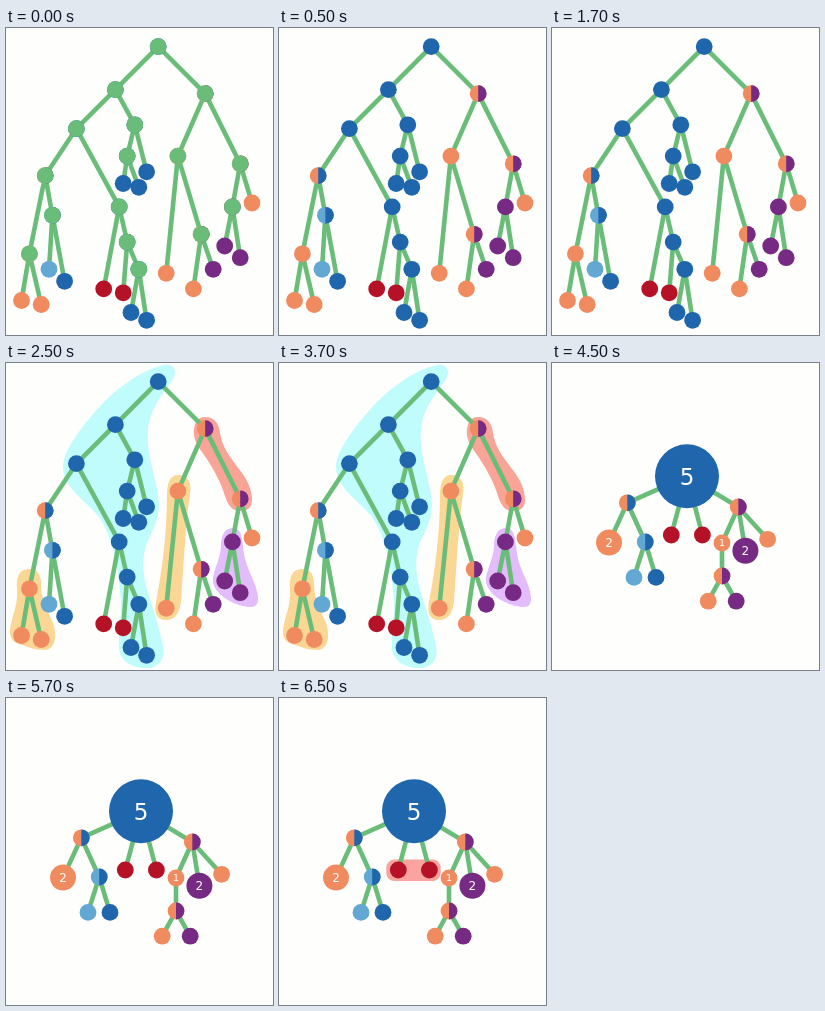
Animation, 267 px wide and 307 px high, one loop 8000 ms. Source, as an HTML page:

```html
<!DOCTYPE html>
<html lang="en">
<head>
<meta charset="utf-8">
<title>Tree contraction</title>
<style>
html, body { margin: 0; width: 100%; height: 100%; overflow: hidden; background: #fefefc; }
svg { display: block; width: 100vw; height: 100vh; }
text { font-family: "DejaVu Sans", sans-serif; fill: #fff; text-anchor: middle; }
</style>
</head>
<body>
<svg id="stage" viewBox="0 0 267 307"></svg>
<script>
const NS = "http://www.w3.org/2000/svg";
const stage = document.getElementById("stage");
const GREEN = "#6abd79";
const RADIUS = 8.4;
const COLOR = { o: "#f08b60", b: "#1f66ad", l: "#62a8d3", p: "#762a83", r: "#b51228" };

function add(parent, tag, attrs = {}) {
  const el = document.createElementNS(NS, tag);
  for (const key in attrs) el.setAttribute(key, attrs[key]);
  parent.appendChild(el);
  return el;
}
const group = attrs => add(stage, "g", attrs);

// Two colour letters give a node split into left and right halves.
function drawNode(parent, [x, y, colors, r = RADIUS, label, size]) {
  add(parent, "circle", { cx: x, cy: y, r, fill: COLOR[colors[0]] });
  if (colors[1])
    add(parent, "path", { d: `M${x} ${y - r}A${r} ${r} 0 0 1 ${x} ${y + r}Z`, fill: COLOR[colors[1]] });
  if (label)
    add(parent, "text", { x, y: y + size * 0.365, "font-size": size }).textContent = label;
}

function drawEdges(parent, nodes, list) {
  for (const pair of list.split(" ")) {
    const [a, b] = [nodes[pair[0]], nodes[pair[1]]];
    add(parent, "line", { x1: a[0], y1: a[1], x2: b[0], y2: b[1], stroke: GREEN, "stroke-width": 4.6 });
  }
}

const full = {
  A: [152, 18.3, "b"], B: [109.2, 61.3, "b"], C: [199, 65.3, "op"], D: [70.2, 100.3, "b"],
  E: [128.6, 96.5, "b"], F: [171.7, 127.8, "o"], G: [234, 135.5, "op"], H: [39, 147.3, "ob"],
  I: [121, 127.8, "b"], J: [140.4, 143.5, "b"], K: [117, 155.2, "b"], L: [132.6, 159, "b"],
  M: [113, 178.6, "b"], N: [46.2, 187, "lb"], O: [23.2, 225.5, "o"], P: [15.3, 272.2, "o"],
  Q: [35, 276.2, "o"], R: [42.8, 241, "l"], S: [58.4, 253, "b"], T: [121, 213.8, "b"],
  U: [97.5, 260.6, "r"], V: [117, 264.5, "r"], W: [132.6, 241, "b"], X: [124.8, 284.2, "b"],
  Y: [140.4, 292, "b"], Z: [160, 245, "o"], a: [195, 206, "op"], b: [187.2, 260.6, "o"],
  c: [207, 241, "p"], d: [226.2, 178.6, "p"], e: [245.8, 174.7, "o"], f: [218.5, 217.7, "p"],
  g: [234, 229.4, "p"]
};
const fullEdges = "AB AC BD BE EI EJ IK IL CF CG FZ Fa ab ac Gd Ge df dg " +
  "DH DM HO HN OP OQ NR NS MU MT TV TW WX WY";

const small = {
  A: [135, 113.3, "b", 32, "5", 23], B: [75.3, 139.8, "ob"], C: [57, 179.6, "o", 13, "2", 12],
  D: [93.2, 179, "lb"], E: [82, 214.4, "l"], F: [104, 214.4, "b"], G: [119.3, 172, "r"],
  H: [150.4, 172, "r"], I: [186.3, 144, "op"], J: [170, 180, "o", RADIUS, "1", 9.5],
  K: [193.4, 187.7, "p", 13, "2", 12], L: [215.6, 176.3, "o"], M: [170, 213, "op"],
  N: [156.2, 238.2, "o"], O: [184.2, 238.2, "p"]
};
const smallEdges = "AB AG AH AI BC BD DE DF IJ IK IL JM MN MO";

const regions = [
  ["#bffcfb", "M158 2C167 0 172 7 167 16C159 29 143 45 142 68C140 86 146 101 150 122" +
    "C156 145 152 158 143 175C135 191 136 211 142 230C147 246 154 267 157 283" +
    "C160 299 150 306 138 305C126 304 115 299 113 286C112 270 117 248 114 228" +
    "C112 205 107 174 93 154C81 138 57 126 57 103C58 86 77 62 96 41C115 22 136 7 158 2Z"],
  ["#fbd795", "M22 206C31 205 35 211 35 221C35 238 42 248 47 260C51 272 50 286 39 287" +
    "C29 287 22 284 13 281C3 278 3 270 5 261C8 248 12 240 11 226C10 214 13 207 22 206Z"],
  ["#fbd795", "M172 112C182 112 186 120 184 131C180 158 178 195 175 238C174 250 169 257 160 257" +
    "C150 257 148 249 150 239C156 208 161 170 161 132C161 120 164 112 172 112Z"],
  ["#f9a497", "M199 54C209 54 213 61 214 70C216 84 224 94 233 106C241 116 246 126 246 137" +
    "C246 145 241 148 234 148C226 148 222 142 219 133C214 117 206 103 196 89" +
    "C190 81 187 74 188 66C189 58 193 54 199 54Z"],
  ["#e3bcfb", "M226 165C234 164 236 172 237 183C238 198 243 207 248 219C253 232 255 245 244 244" +
    "C228 243 209 232 207 219C206 209 214 198 215 184C215 173 218 166 226 165Z"]
];

const blobs = group();
for (const [fill, d] of regions) add(blobs, "path", { d, fill });

const shift = { transform: "translate(0.2 0.3)" };
const tree = group(shift);
drawEdges(tree, full, fullEdges);
Object.values(full).forEach(n => drawNode(tree, n));

const plain = group(shift);
const parents = new Set(fullEdges.split(" ").map(pair => pair[0]));
for (const id of parents)
  add(plain, "circle", { cx: full[id][0], cy: full[id][1], r: RADIUS, fill: GREEN });

const pairBox = group();
add(pairBox, "rect", { x: 107.3, y: 161.6, width: 54.4, height: 21.4, rx: 8, fill: "#fba49d" });

const merged = group();
drawEdges(merged, small, smallEdges);
Object.values(small).forEach(n => drawNode(merged, n));

const show = (el, on) => el.setAttribute("display", on ? "inline" : "none");

function render(t) {
  show(plain, t < 500);
  show(tree, t < 4500);
  show(blobs, t >= 2500 && t < 4500);
  show(merged, t >= 4500);
  show(pairBox, t >= 6500);
}

const start = performance.now();
function tick() {
  render((performance.now() - start) % 8000);
  requestAnimationFrame(tick);
}
tick();
</script>
</body>
</html>
```
